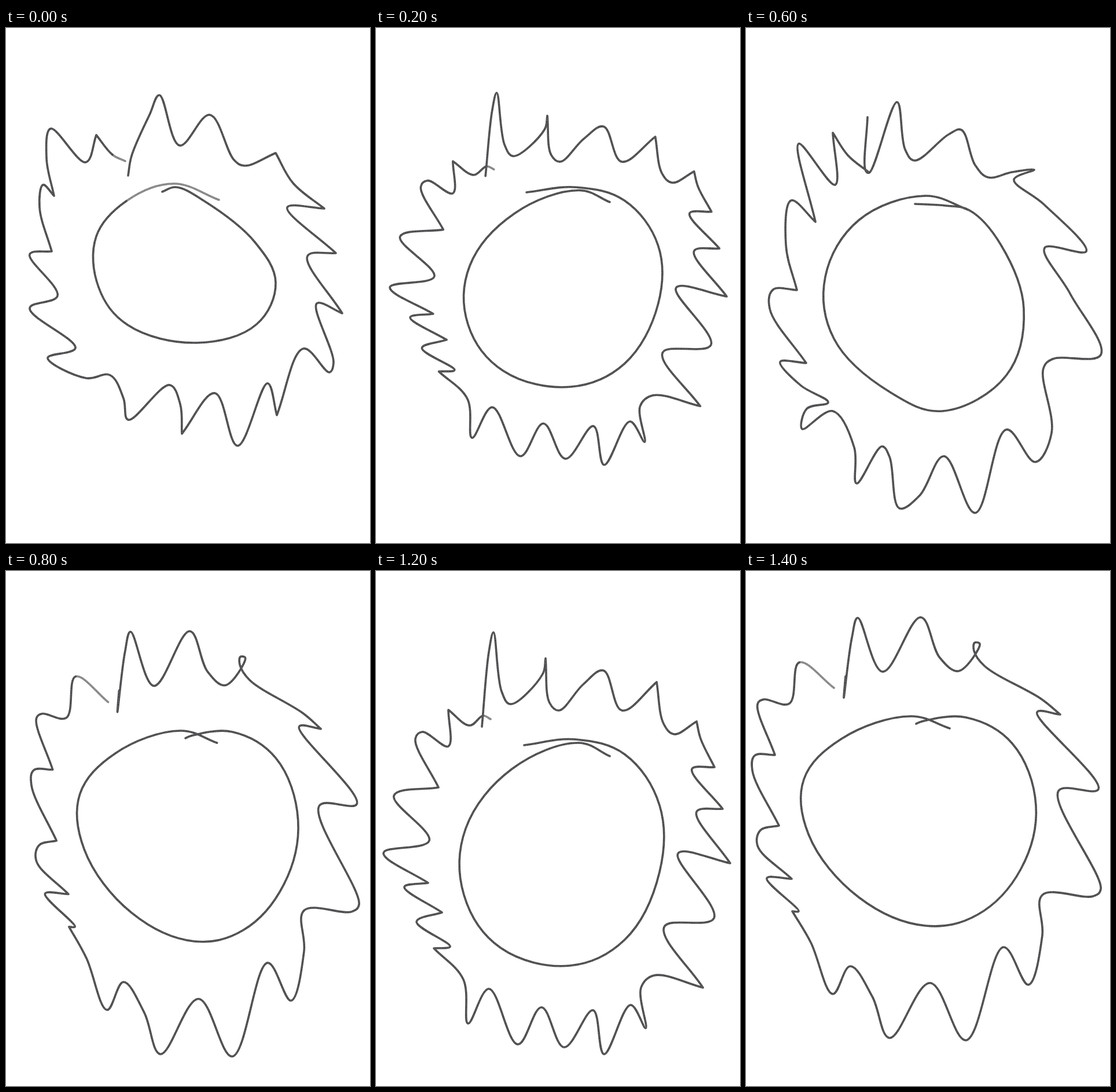
An HTML page with a canvas for the animation above (1600 ms loop, 629x890 px).

```html
<!DOCTYPE html>
<html lang="en">
<head>
<meta charset="utf-8">
<title>Pencil sun</title>
<style>
html, body { margin: 0; height: 100%; overflow: hidden; background: #fff; }
canvas { display: block; }
</style>
</head>
<body>
<canvas id="stage" width="629" height="890"></canvas>
<script>
const ctx = document.getElementById("stage").getContext("2d");
const STEP = 200;
const ROUND = 0.36;

// Key points "x,y x,y ...": ^ marks a sharp corner, ~ light pencil pressure
const stroke = text => text.split(" ").map(word => {
  const [x, y] = word.split(",").map(parseFloat);
  return { x, y, sharp: word.endsWith("^"), pale: word.endsWith("~") };
});

// Rays are given by their tips and valleys, the disc by points around it
const sun = (rays, disc) => [stroke(rays), stroke(disc)];

// Moves and scales a sun so that its rays fill the given box
function fit([rays, disc], left, top, right, bottom) {
  const xs = rays.map(p => p.x), ys = rays.map(p => p.y);
  const x0 = Math.min(...xs), y0 = Math.min(...ys);
  const sx = (right - left) / (Math.max(...xs) - x0);
  const sy = (bottom - top) / (Math.max(...ys) - y0);
  return [rays, disc].map(line => line.map(p => ({
    ...p, x: left + (p.x - x0) * sx, y: top + (p.y - y0) * sy
  })));
}

const spiky = sun(
  "211,255 217,221 248,150 265,116 300,203 352,150 394,228 412,238 466,216^ 496,268 550,312^ 486,310 570,389^ 521,394 581,493^ 537,476 566,578 559,595 514,554 468,669^ 452,614 400,722 361,631 304,701^ 301,650 283,617 211,677 203,640 180,600 138,605 72,570 120,553 41,484 89,463 41,391 79,386^ 58,310 64,271 83,290^ 70,225 77,174 138,232 156,185^ 184,219 206,230~",
  "270,283 293,275 341,298 430,370 466,440 433,512 330,544 210,513 160,448 156,360 208,299 290,269~ 368,297~");

const broad = sun(
  "203,284 207,140 213,115 222,133 273,260 373,157^ 357,230 378,288 428,279 515,307^ 456,313 500,351 560,423 497,413 587,592 500,576 545,708 435,675 412,722 378,800 361,725 346,701 274,822 234,700 174,786 153,690 133,654 78,700 59,685 60,640 99,590 45,547 20,515 67,514^ 20,430 17,367 67,386^ 47,290 55,243 129,297 128,224^ 162,256 186,278~",
  "270,339~ 318,327 405,365 460,445 464,550 424,635 335,661 238,639 142,563 120,485 170,393 265,345 330,347 396,370");

const leaning = sun(
  "210,154 207,247 213,250 261,128 275,210 291,229 350,184 372,176 396,237 418,258 460,249 498,245 463,262 515,305 588,386 516,380 560,459 613,565 530,572 514,588 528,700 500,750 450,694 396,838 342,740 300,808 265,830 248,741 235,723 191,787 187,725 150,662 97,693 105,658 142,647 95,618 59,577 104,579^ 41,485 47,452 88,453^ 69,375 78,298 120,335^ 91,200 154,271 150,181^ 176,220 213,250",
  "292,304 345,307 386,315 440,374 480,485 450,600 340,662 250,630 152,537 137,430 195,332 310,290 386,315");

const loose = sun(
  "179,272~ 172,297 184,210 198,84^ 225,208 241,226 301,144 319,213 348,250 425,199 447,201 465,281 495,315 570,323 585,353 530,412 599,537 540,541 519,556 550,700 530,723 395,684 386,730 366,804 344,745 322,701 250,800 232,710 192,645 153,690 130,590 109,525 120,519 85,494 57,446 118,436^ 86,345 105,316 143,334^ 138,265 178,283 196,299~",
  "268,303 360,281 445,318 485,415 470,544 400,624 300,637 205,587 156,495 170,390 230,320 325,296 404,324");

const dense = sun(
  "183,269~ 195,140 203,106 217,208 232,230 288,178 293,151^ 300,228 316,241 358,196 393,172 425,241 485,192^ 497,264 515,282 554,260^ 561,290 585,339^ 546,342 599,411^ 554,416 612,505^ 522,488 584,600 498,615 565,720^ 480,699 458,720 466,790 440,750 394,835 375,759 325,823 286,754 245,818 195,722 159,782 151,706 100,652^ 128,649 70,606 114,590^ 49,546 90,539^ 13,487 92,466 31,388 108,374^ 68,290 80,278 125,303 125,240^ 162,267 185,250 198,256~",
  "256,301~ 345,291 430,317 490,405 490,520 430,637 335,682 215,651 152,560 155,445 235,342 350,297 404,320");

const wide = sun(
  "172,182~ 169,219 183,115 193,81 236,174 302,80 335,150 367,173 404,126 395,124 394,138 412,164 510,221 543,248^ 503,244 609,377 540,380 613,550 600,562 512,560 512,630 488,715 445,650 380,811 318,712 248,807 218,735 180,683 150,731 112,642 80,588^ 91,588 36,531 79,532^ 20,475 25,448 57,440^ 11,345 15,319 50,318^ 20,230 30,222 75,229 92,158 152,202~",
  "294,264 304,260 380,253 460,298 501,405 475,515 400,594 310,613 195,564 108,455 100,360 165,290 285,251 352,272");

const suns = [
  spiky, fit(dense, 24, 112, 606, 755), broad, leaning,
  fit(wide, 44, 104, 610, 839), loose, dense, wide
];

// Centripetal spline handle at b, on the side towards c
function handle(a, b, c) {
  const dx = c.x - b.x, dy = c.y - b.y;
  if (!a || b.sharp) return [b.x + dx / 3, b.y + dy / 3];
  const near = Math.hypot(dx, dy);
  const far = Math.hypot(b.x - a.x, b.y - a.y);
  const k = near * ROUND / (1 + Math.sqrt(near / far));
  return [
    b.x + k * (dx / near + (b.x - a.x) / far),
    b.y + k * (dy / near + (b.y - a.y) / far)
  ];
}

function curve(line, pale) {
  const path = new Path2D();
  let last = null;
  for (let i = 1; i < line.length; i++) {
    const a = line[i - 1], b = line[i];
    if (b.pale !== pale) continue;
    if (last !== a) path.moveTo(a.x, a.y);
    path.bezierCurveTo(...handle(line[i - 2], a, b), ...handle(line[i + 1], b, a), b.x, b.y);
    last = b;
  }
  return path;
}

function pencil(path, color, grain) {
  ctx.setLineDash([]);
  ctx.lineWidth = 3.6;
  ctx.strokeStyle = color;
  ctx.stroke(path);
  ctx.setLineDash([1, 2, 2, 3, 1, 4]);
  ctx.lineWidth = 1.2;
  ctx.strokeStyle = grain;
  ctx.stroke(path);
}

const paths = suns.map(lines => lines.map(line => [curve(line, true), curve(line, false)]));
ctx.lineCap = ctx.lineJoin = "round";

function frame(now) {
  ctx.clearRect(0, 0, 629, 890);
  for (const [light, dark] of paths[Math.floor(now / STEP) % paths.length]) {
    pencil(light, "#858586", "#9a9a9b");
    pencil(dark, "#4b4b4d", "#67676a");
  }
  requestAnimationFrame(frame);
}
frame(0);
</script>
</body>
</html>
```
